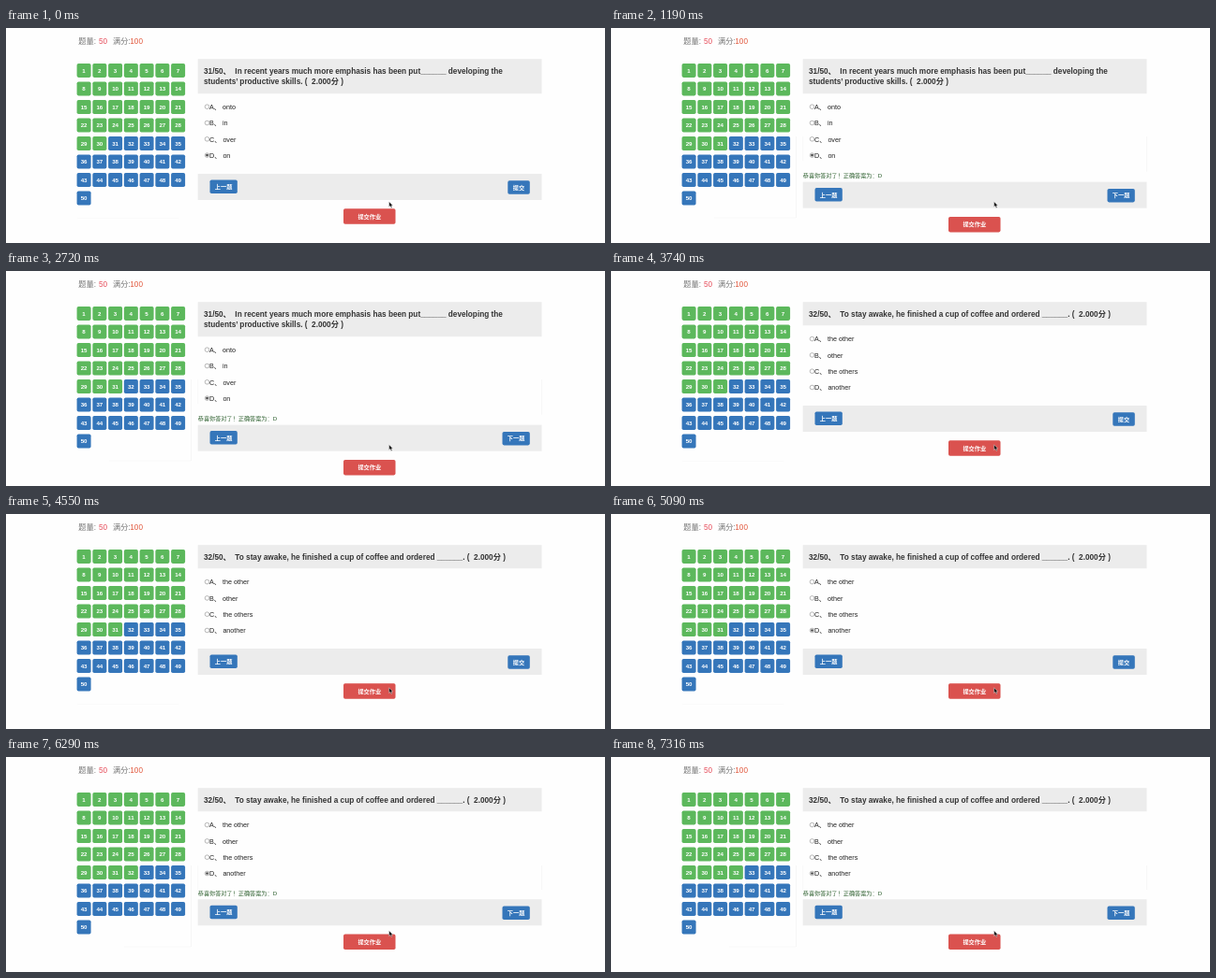
Write an HTML page that moves like this. It is 639x230 px and loops after 8 s.

```html
<!DOCTYPE html>
<html lang="zh-CN">
<head>
<meta charset="utf-8">
<title>Quiz</title>
<style>
html, body { margin: 0; width: 100%; height: 100%; overflow: hidden; background: #fefefe; }
svg { display: block; width: 639px; height: 230px; font: 8.23px "Liberation Sans", Arial, "Noto Sans CJK SC", "Noto Sans CJK", sans-serif; }
text { white-space: pre; fill: #333; }
.bold { font-weight: bold; }
.option { font-size: 7.2px; fill: #222; }
.label { font-size: 6.2px; font-weight: bold; fill: #fff; text-anchor: middle; }
.feedback { font-size: 6.15px; fill: #2c5f2d; }
.total { fill: #777; }
</style>
</head>
<body>
<svg id="stage" viewBox="0 0 639 230"></svg>
<script>
const GREEN = '#5cb85c', BLUE = '#3576ba', RED = '#da524f', GRAY = '#ececec', FAINT = '#f4f4f4';
const LOOP = 8000;

const questions = [
  {
    lines: ['31/50、  In recent years much more emphasis has been put______ developing the',
            'students’ productive skills. (  2.000分 )'],
    options: ['onto', 'in', 'over', 'on'],
    headerHeight: 37, optionsTop: 84.2
  },
  {
    lines: ['32/50、  To stay awake, he finished a cup of coffee and ordered ______. (  2.000分 )'],
    options: ['the other', 'other', 'the others', 'another'],
    headerHeight: 25, optionsTop: 72.6
  }
];

// footer: top of the grey bar; feedback: baseline of the verdict line
const states = [
  { at: 0,    question: 0, done: 30, selected: 3,  footer: 156 },
  { at: 1190, question: 0, done: 31, selected: 3,  footer: 164.6, feedback: 159.7, ruleFrom: 110 },
  { at: 3740, question: 1, done: 31, selected: -1, footer: 144 },
  { at: 5090, question: 1, done: 31, selected: 3,  footer: 144 },
  { at: 6290, question: 1, done: 32, selected: 3,  footer: 152.3, feedback: 148.1, ruleFrom: 126 }
];

const rect = (x, y, w, h, fill, r = 0) =>
  `<rect x="${x}" y="${y}" width="${w}" height="${h}" rx="${r}" fill="${fill}"/>`;
const text = (x, y, content, cls = '') => `<text x="${x}" y="${y}" class="${cls}">${content}</text>`;
const button = (x, y, w, h, fill, label) =>
  rect(x, y, w, h, fill, 1.8) + text(x + w / 2, y + h / 2 + 2.3, label, 'label');

function summary() {
  return text(77.3, 16.6, '题量:', 'total') + text(114, 16.6, '满分:', 'total') +
    '<text x="99" y="16.6" style="fill:#e64f5c">50</text>' +
    '<text x="132.3" y="16.6" style="fill:#e25c42">100</text>';
}

function numberGrid(done) {
  let out = '';
  for (let i = 0; i < 50; i++) {
    const x = 75.6 + i % 7 * 16.75, y = 37.9 + Math.floor(i / 7) * 19.52;
    out += button(x, y, 15, 15, i < done ? GREEN : BLUE, i + 1);
  }
  return out;
}

function questionPanel({ lines, options, headerHeight, optionsTop }, selected) {
  let out = rect(204.7, 33.2, 366.8, headerHeight, GRAY);
  lines.forEach((line, i) => out += text(211, 48.5 + i * 11.8, line, 'bold'));
  options.forEach((option, i) => {
    const y = optionsTop + i * 17.3;
    out += `<circle cx="214.5" cy="${y}" r="2.3" fill="#fff" stroke="#999" stroke-width=".7"/>`;
    if (i === selected) out += `<circle cx="214.5" cy="${y}" r="1.3" fill="#444"/>`;
    out += text(217, y + 2.7, 'ABCD'[i] + '、 ' + option, 'option');
  });
  return out;
}

function feedbackLine({ feedback, ruleFrom }) {
  if (!feedback) return rect(76, 203, 108, .7, '#f9f9f9');
  return rect(197, 116, .8, 87, FAINT) + rect(ruleFrom, 202.6, 197 - ruleFrom, .8, FAINT) +
    rect(204.5, 116, .6, 26, FAINT) + rect(571, 116, .7, feedback - 6, FAINT).replace(
      /height="[^"]+"/, `height="${feedback - 122}"`) +
    text(204.8, feedback, '恭喜你答对了！正确答案为：D', 'feedback');
}

function footer({ footer: y, feedback }) {
  const next = feedback ? button(529.5, y + 7.3, 29.3, 14.5, BLUE, '下一题')
                        : button(535.3, y + 7.3, 23.5, 14.5, BLUE, '提交');
  return rect(204.7, y, 366.8, 28, GRAY) + button(217.5, y + 6.5, 29.3, 14.5, BLUE, '上一题') + next +
    button(360, y + 37.3, 55.5, 16.5, RED, '提交作业');
}

const cursor = '<path d="M408.6 185.8v5.7l1.3-1.2 1 2.2 1.1-.5-1-2.1h1.7z" fill="#111" stroke="#fff" stroke-width=".4"/>';
const stage = document.getElementById('stage');
let shown;

function render() {
  const time = performance.now() % LOOP;
  const state = states.findLast(s => s.at <= time);
  if (state !== shown) {
    shown = state;
    stage.innerHTML = summary() + numberGrid(state.done) +
      questionPanel(questions[state.question], state.selected) +
      feedbackLine(state) + footer(state) + cursor;
  }
  requestAnimationFrame(render);
}
render();
</script>
</body>
</html>
```
